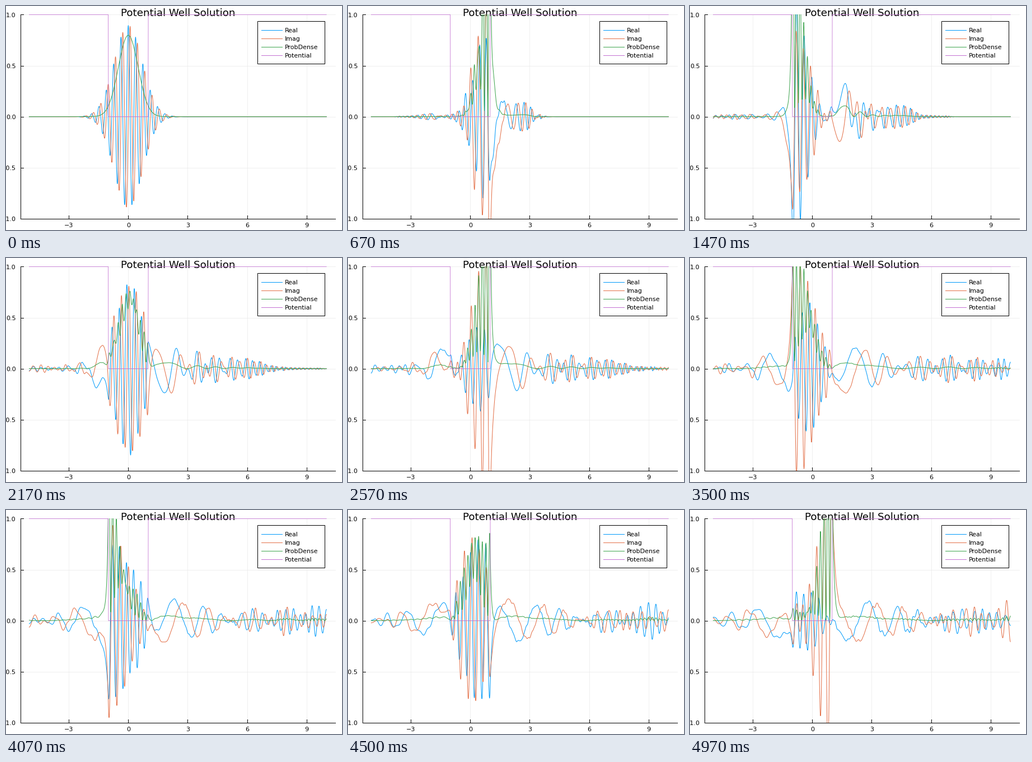
A matplotlib script for the animation above (5010 ms loop, 600 by 400 pixels).

```python
import numpy as np
import matplotlib.pyplot as plt
from matplotlib.animation import FuncAnimation
from matplotlib.patches import Rectangle

plt.rcParams["font.family"] = "DejaVu Sans"

W, H, DPI = 600, 400, 100
FRAMES, LOOP = 150, 5010
PT = 72 / DPI  # points per pixel
BLUE, ORANGE, GREEN, PURPLE = "#009afa", "#e36f47", "#3ea44e", "#c371d2"

# Wave packet in a finite square well (hbar = m = 1)
K0, V0 = 16.95, 171.0
STEP, SUBSTEPS = 0.00108, 4
N = 1501
x = np.linspace(-5, 10, N)
dx = x[1] - x[0]
wall = (np.abs(x) > 1 + 1e-9).astype(float)


def evolve():
    """Crank-Nicolson wave function for every frame, zero-slope ends."""
    diag = np.full(N, 1 / dx**2)
    diag[[0, -1]] /= 2
    off = np.full(N - 1, -0.5 / dx**2)
    ham = np.diag(diag + V0 * wall) + np.diag(off, 1) + np.diag(off, -1)
    energy, modes = np.linalg.eigh(ham)
    start = (2 / np.pi) ** 0.25 * np.exp(-x**2 + 1j * K0 * x)
    coef = modes.T @ start
    turn = 2 * np.arctan(energy * STEP / 2)  # phase of one Cayley step
    n = np.arange(FRAMES) * SUBSTEPS
    phased = coef[:, None] * np.exp(-1j * np.outer(turn, n))
    return (modes @ phased.real + 1j * (modes @ phased.imag)).T


psi = evolve()

fig = plt.figure(figsize=(W / DPI, H / DPI), dpi=DPI, facecolor="white")

# Pixel-space layer for axes lines, labels and legend
page = fig.add_axes([0, 0, 1, 1])
page.set(xlim=(0, W), ylim=(H, 0))
page.axis("off")

L, R, T, B = 25.5, 588.1, 15.4, 379.9
ax = fig.add_axes([L / W, 1 - B / H, (R - L) / W, (B - T) / H])
ax.set(xlim=(-5.45, 10.45), ylim=(-1, 1))
ax.axis("off")


def px(v):
    return L + (v + 5.45) / 15.9 * (R - L)


def py(v):
    return T + (1 - v) / 2 * (B - T)


def seg(x0, y0, x1, y1, color="black", width=1.0):
    page.plot([x0, x1], [y0, y1], color=color, lw=width * PT)


def label(x0, y0, text, size=11.1, ha="center"):
    page.text(x0, y0, text, fontsize=size * PT, ha=ha, va="baseline")


for v in (-3, 0, 3, 6, 9):
    seg(px(v), T, px(v), B, "#e9e9e9", 0.7)
    seg(px(v), B, px(v), B - 5.5)
    label(px(v), 395, str(v).replace("-", "\u2212"))
for v in (-1, -0.5, 0, 0.5, 1):
    seg(L, py(v), R, py(v), "#e9e9e9", 0.7)
    seg(L, py(v), L + 5.5, py(v))
    label(17.8, py(v) + 4.2, f"{v:.1f}".replace("-", "\u2212"), ha="right")
seg(L, T, L, B)
seg(L, B, R, B)
label((L + R) / 2, 18, "Potential Well Solution", 18.3)

real, imag, dens = (ax.plot([], [], color=c, lw=PT)[0]
                    for c in (BLUE, ORANGE, GREEN))
ax.plot(x, wall, color=PURPLE, lw=0.8 * PT, zorder=3, clip_on=False)

# Legend sits above the curves
key = fig.add_axes([0, 0, 1, 1])
key.set(xlim=(0, W), ylim=(H, 0))
key.axis("off")
key.add_patch(Rectangle((449.4, 27.4), 120, 76, fc="white", ec="black", lw=PT))
rows = zip(("Real", "Imag", "ProbDense", "Potential"),
           (BLUE, ORANGE, GREEN, PURPLE))
for i, (name, color) in enumerate(rows):
    y = 42.6 + 15.2 * i
    key.plot([456, 493], [y, y], color=color, lw=PT)
    key.text(498, y + 4.1, name, fontsize=11 * PT, va="baseline")


def draw(i):
    p = psi[i]
    real.set_data(x, p.real)
    imag.set_data(x, p.imag)
    dens.set_data(x, np.abs(p) ** 2)
    return real, imag, dens


anim = FuncAnimation(fig, draw, frames=FRAMES, interval=LOOP / FRAMES,
                     init_func=lambda: draw(0), repeat=True, blit=False)
plt.show()
```
